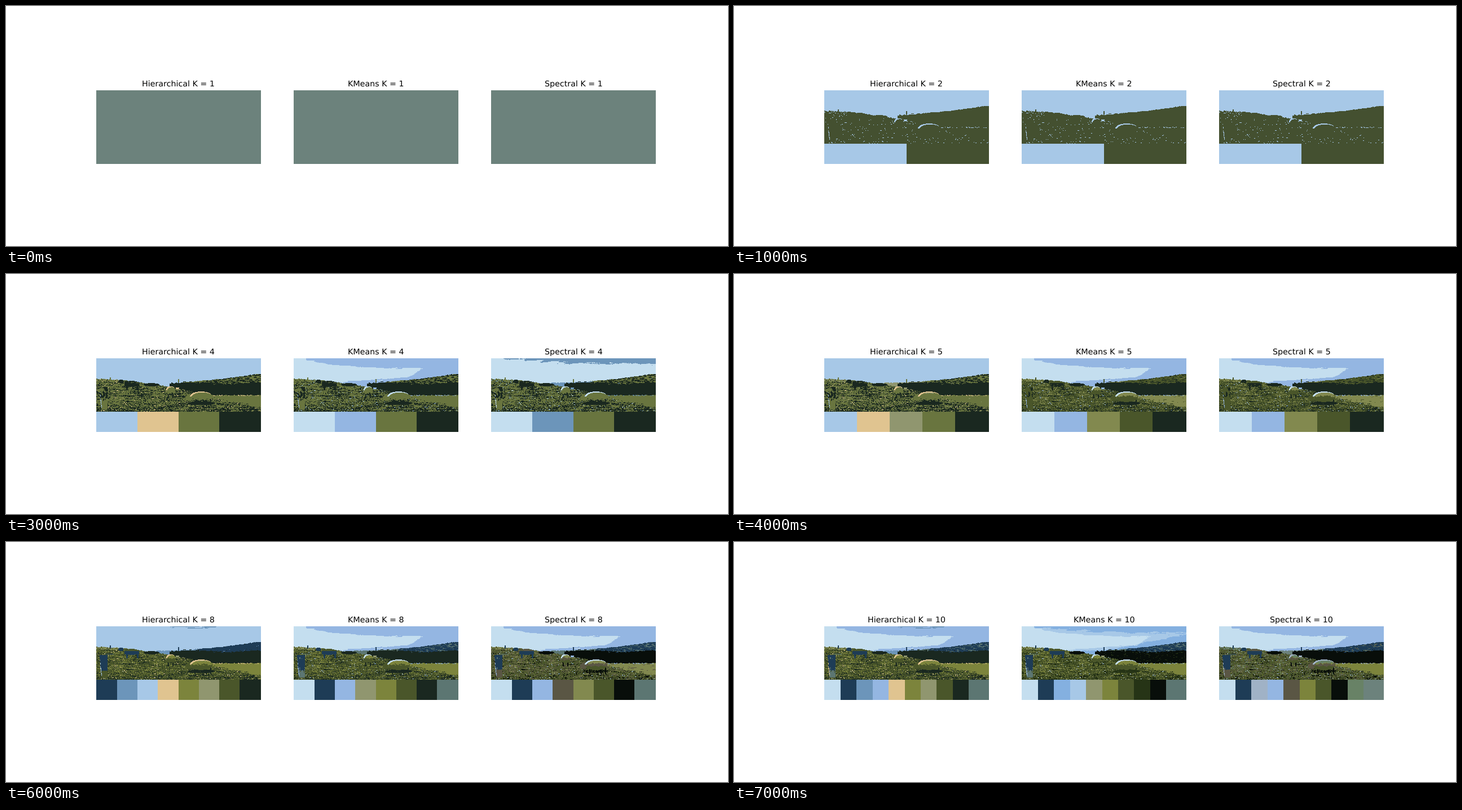
Animation of 1280x427 px, one loop 8 s. Source, as a matplotlib script:

```python
import numpy as np
import matplotlib.pyplot as plt
from matplotlib.animation import FuncAnimation

STAGE_W, STAGE_H, DPI = 1280, 427, 128
W, H, SCENE_H = 292, 131, 95
PHOTO_W = 298  # swatch widths are whole pixels of this width
KS = [1, 2, 3, 4, 5, 6, 8, 10]

SHADES = {
    "p": "c4deef", "a": "a7c8e7", "b": "94b6e2", "z": "84b0e0", "s": "6c95ba",
    "l": "a0b2c6", "n": "1e3c56", "t": "e0c490", "k": "90966f", "f": "82894f",
    "o": "7c843c", "g": "69753f", "m": "4a562a", "w": "445030", "h": "263416",
    "d": "1a2820", "x": "080e0a", "u": "5a5644", "j": "688266", "e": "5c7672",
    "c": "6c827c",
}

# One word per K, one shade per letter
PALETTES = {
    "Hierarchical": "c aw agd atgd atkgd satkgd nsatokmd pnsbtokmde",
    "KMeans": "c aw agd pbgd pbfmd pnbfmd pnbkomde pnzakomhxe",
    "Spectral": "c aw agd psgd pbfmd npbfmx pnbufmxe pnlbuomxjc",
}

rng = np.random.default_rng(7)
yy, xx = np.mgrid[:SCENE_H, :W] + 0.5


def noise(sx, sy):
    """Random texture of unit spread, smeared over sx by sy pixels."""
    n = rng.normal(size=(SCENE_H, W))
    n = sum(np.roll(n, i, 1) for i in range(sx))
    n = sum(np.roll(n, i, 0) for i in range(sy))
    return n / n.std()


def blob(cx, cy, rx, ry):
    return ((xx - cx) / rx) ** 2 + ((yy - cy) / ry) ** 2 < 1


def box(x0, x1, y0, y1):
    return (xx > x0) & (xx < x1) & (yy > y0) & (yy < y1)


def ramp(start, end, values):
    return np.clip((values - start) / (end - start), 0, 1)


def paint(img, color, amount, grain=0):
    """Blend a colour, lightened by grain, into img by a mask or weight."""
    a = np.asarray(amount, float)[..., None]
    img += (np.array(color, float) + np.asarray(grain)[..., None] - img) * a


def paint_sky(img):
    streak = noise(14, 2)
    paint(img, (134, 172, 220), np.ones_like(xx))
    high = 10 - 16 * np.exp(-xx / 70)
    paint(img, (152, 189, 229), ramp(-5, 3, yy - high + 1.5 * streak))
    paint(img, (122, 160, 206), blob(172, 1, 42, 3.5) & (streak > -0.6))
    haze = 14 + 24 * ((292 - xx) / 117)
    paint(img, (156, 182, 215), yy + 0.7 * streak > haze)

    upper = np.where(xx < 22, -9, 18.5 - 16 * np.exp(-(xx - 22) / 60))
    lower = np.minimum(43 - 0.08 * (xx - 80), 33 - 0.62 * (xx - 205))
    inside = np.minimum(yy - upper, lower - yy) + 0.7 * streak
    paint(img, (198, 222, 242), ramp(-1, 1, inside))


def paint_hills(img):
    ridge = 43.5 - 15.5 * ramp(108, 285, xx) ** 1.8
    hill = (yy > ridge + 0.3 * noise(2, 1)) & (xx > 105)
    paint(img, (47, 76, 94), hill, 12 * noise(4, 1))
    paint(img, (104, 142, 180), hill * ramp(200, 150, xx))
    trees = 44 - 1.5 * np.cos((xx - 170) / 20)
    belt = (yy > trees + 0.9 * noise(4, 1)) & (xx > 130)
    paint(img, (17, 25, 15), belt, 4 * noise(3, 1))


def paint_meadow(img):
    crest = np.interp(xx, [0, 48, 110, 205], [36, 39, 47, 65.5])
    meadow = yy > crest + 0.4 * noise(2, 1)
    grain = 0.6 * noise(1, 1) + 0.4 * noise(2, 1) + 0.5 * noise(12, 2)
    grain -= 0.8 * ramp(78, 95, yy) + 0.8 * blob(165, 63, 40, 7)
    paint(img, (76, 89, 44), meadow, 24 * grain)

    field_end = 70 + 18 * ramp(200, 290, xx) + 1.5 * noise(6, 2)
    field = meadow & (xx > 200) & (yy < field_end)
    paint(img, (116, 129, 62), field, 6 * noise(8, 1))

    flowers = ramp(1.6, 2.6, noise(2, 1) + 0.5 * noise(24, 2))
    paint(img, (184, 190, 166), flowers * (meadow & ~field))
    paint(img, (176, 186, 166), field & (yy < 67) & (noise(3, 1) > 0.5))
    backlit = meadow & (xx < 50) & (yy < crest + 4)
    paint(img, (152, 164, 128), backlit * ramp(-1.5, 1.5, noise(2, 1)))

    paint(img, (20, 28, 20), blob(98, 47, 14, 2.8))
    for x, y in ((25, 34), (146, 37)):
        paint(img, (60, 84, 96), box(x - 0.7, x + 0.7, y, y + 6))


def paint_cow(img):
    body = blob(63, 45.5, 13, 5.5) | blob(44, 41, 5, 3) | box(50, 76, 42, 50)
    legs = box(53, 56, 48, 57) | box(72, 75, 48, 57)
    paint(img, (38, 58, 74), body | legs, 4 * noise(3, 2))
    paint(img, (84, 74, 62), 0.6 * (body & (xx > 50) & (yy < 44)))


def paint_post(img):
    post = box(6, 20, 51, 91) & (xx > 6 + (yy - 51) / 14)
    paint(img, (36, 72, 104), post, 7 * noise(2, 5))
    paint(img, (86, 98, 82), post * ramp(70, 84, yy))
    paint(img, (60, 90, 110), box(16, 31, 49, 50.2))
    shine = abs(xx - 5.5 - (yy - 51) / 9) < 0.7
    paint(img, (186, 196, 186), shine & box(0, 20, 60, 91) & (noise(1, 3) > 0))


def paint_sheep(img, cx, cy, rx, ry, legs):
    """A round body, dark below, with a bright rim on its upper left."""
    for leg in legs:
        paint(img, (30, 36, 22), box(leg - 1.3, leg + 1.3, cy, cy + 1.75 * ry))
    body = blob(cx, cy, rx, ry)
    paint(img, (126, 138, 92), body)
    paint(img, (50, 61, 32), body * ramp(-0.8 * ry, ry, yy - cy + noise(3, 2)))
    rim = body & ~blob(cx + 2, cy + 1.7, rx, ry) & (yy < cy)
    paint(img, (206, 204, 182), rim)


def make_scene():
    img = np.zeros((SCENE_H, W, 3))
    for part in (paint_sky, paint_hills, paint_meadow, paint_cow, paint_post):
        part(img)
    paint(img, (24, 32, 18), 0.75 * blob(186, 80, 24, 3.5))
    paint(img, (84, 92, 56), blob(164, 70.5, 6, 5.5))
    paint_sheep(img, 186, 68.5, 20, 9.5, (175, 195, 203))
    paint_sheep(img, 132, 57.5, 8.5, 8, (128, 136))
    paint(img, (172, 174, 146), blob(144, 53.3, 3, 1.7))
    return np.clip(img, 0, 255)


def quantize(scene, word):
    """Scene in its nearest palette colours, with the swatches below."""
    colors = np.array([list(bytes.fromhex(SHADES[c])) for c in word], float)
    k = len(word)
    dist = ((scene[:, :, None] - colors) ** 2).sum(axis=3)
    column = np.arange(W) * PHOTO_W // W
    swatch = np.minimum(column // (PHOTO_W // k), k - 1)
    index = np.vstack([dist.argmin(axis=2), np.tile(swatch, (H - SCENE_H, 1))])
    return colors[index].astype(np.uint8)


scene = make_scene()
images = {name: [quantize(scene, word) for word in words.split()]
          for name, words in PALETTES.items()}

plt.rcParams["text.hinting"] = "none"
fig, axes = plt.subplots(1, 3, figsize=(STAGE_W / DPI, STAGE_H / DPI), dpi=DPI)
panels = []
for ax, name in zip(axes, images):
    ax.axis("off")
    picture = ax.imshow(images[name][0], interpolation="nearest")
    title = ax.set_title("", fontsize=8, pad=4, family="DejaVu Sans")
    panels.append((name, picture, title))


def update(step):
    for name, picture, title in panels:
        picture.set_data(images[name][step])
        title.set_text(f"{name} K = {KS[step]}")
    return [artist for panel in panels for artist in panel[1:]]


anim = FuncAnimation(fig, update, frames=len(KS), interval=1000, repeat=True)
plt.show()
```
